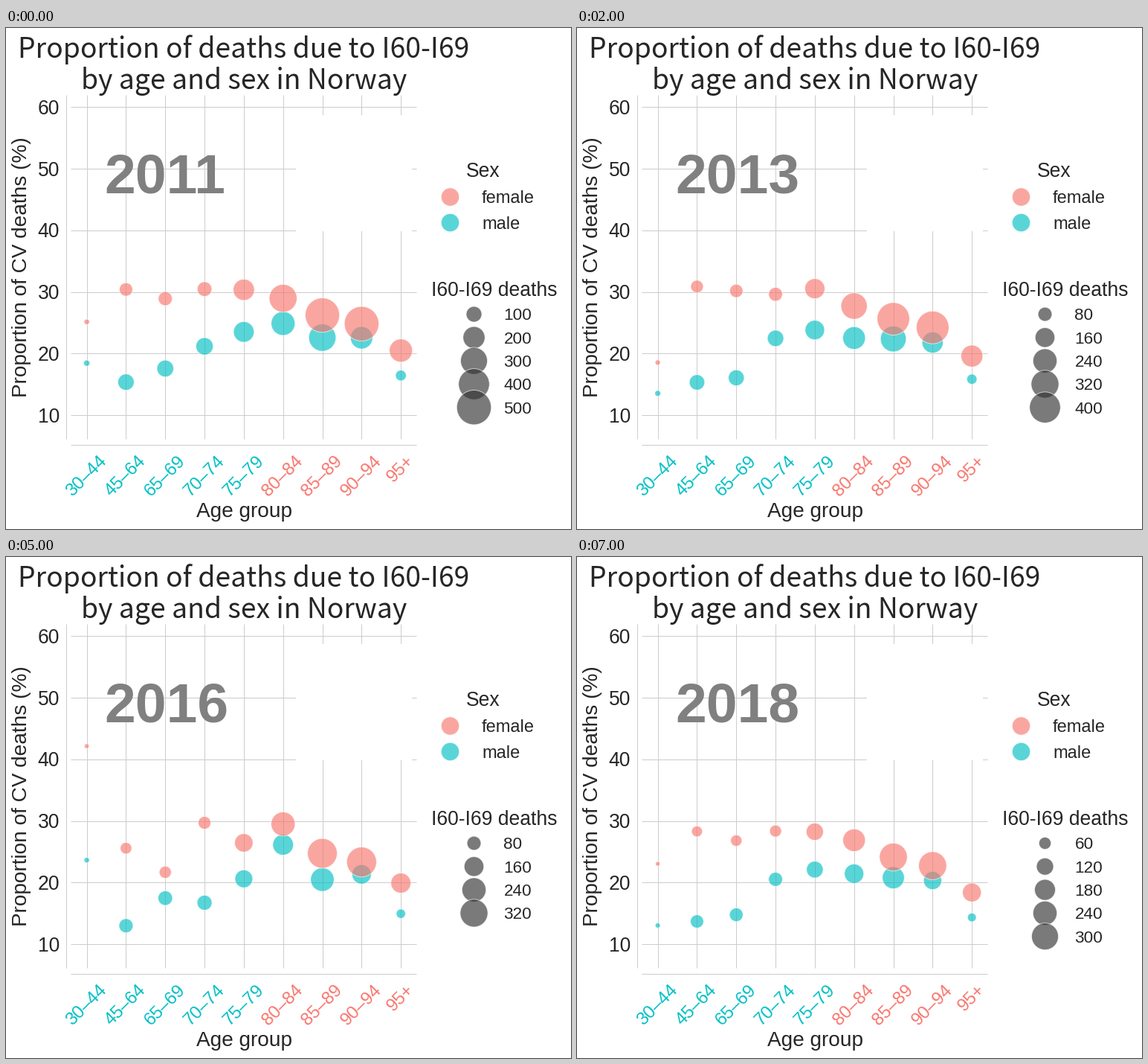
A matplotlib script that plays this animation: 760x673 px, repeating every 8 s.

```python
import numpy as np
import matplotlib.pyplot as plt
from matplotlib.animation import ArtistAnimation
from matplotlib.patches import Circle, Rectangle

W, H, DPI = 760, 673, 100
RED, TEAL, INK, GRID, GREY = "#F8766D", "#00BFC4", "#262626", "#cccccc", "#808080"
PX = 72 / DPI  # points per pixel
ALPHA = 0.65

AGES = ["30–44", "45–64", "65–69", "70–74", "75–79", "80–84", "85–89", "90–94", "95+"]
FIRST, COUNT, MID = 2011, 8, 2014.2
DRIFT = -0.3   # percentage points per year
SHRINK = 0.03  # share of the bubble radius lost per year
RADIUS_AGES = [0, 1, 3, 6, 7, 8]

# Each share is its mean, a common drift and an age group's part in the yearly swing.
MALE = dict(
    color=TEAL, z=4,
    mean=[16.9, 14.5, 16.5, 20.5, 22.7, 23.7, 21.7, 21.6, 15.5],
    part=[1, -0.13, 0.21, -0.44, -0.21, 0.41, -0.09, 0.04, 0],
    swing=[0.6, 1.1, -3.7, -3.3, -2.8, 7.3, 2.3, -2.7],
    radius=[3.6, 9.8, 10.4, 16.5, 13.5, 6.4])
FEMALE = dict(
    color=RED, z=5,
    mean=[31.2, 28.2, 25.8, 29.8, 28.5, 28.8, 25.3, 23.9, 19.9],
    part=[1, -0.18, -0.31, 0.04, -0.13, 0.11, 0, 0, 0.05],
    swing=[-7, 15.5, -13, -6, 0, 11.5, 2, -7],
    radius=[3.2, 8, 8.8, 20.9, 21, 14])

fig = plt.figure(figsize=(W / DPI, H / DPI), dpi=DPI, facecolor="white")
ax = fig.add_axes([0, 0, 1, 1])
ax.set_xlim(0, W)
ax.set_ylim(H, 0)
ax.axis("off")


def age_x(i):
    return 108.6 + 52.82 * i


def pct_y(v):
    return 603 - 8.276 * v


def text(x, y, s, px, ha="left", va="baseline", color=INK, font="Liberation Sans", **kw):
    return ax.text(x, y, s, fontsize=px * PX, ha=ha, va=va, color=color,
                   family=font, zorder=3, **kw)


def line(x0, y0, x1, y1):
    ax.plot([x0, x1], [y0, y1], color=GRID, lw=PX, solid_capstyle="butt", zorder=1)


def bubble(x, y, r, color, z=4):
    return ax.add_patch(Circle((x, y), r + 0.2, fc=color, ec="white",
                               lw=PX, alpha=ALPHA, zorder=z))


def age_color(i, year):
    if year == 2015 and i == 0:  # tie between the sexes
        return INK
    return TEAL if i < (6 if year in (2014, 2015) else 5) else RED


def size_steps(year):
    step = 100 if year < 2013 else 80 if year < 2017 else 60
    return [step * k for k in range(1, 5 if year == 2016 else 6)]


def draw_static():
    for s, y in (("Proportion of deaths due to I60-I69", 40),
                 ("by age and sex in Norway", 82)):
        text(320, y, s, 37.3, ha="center", font="Noto Sans CJK JP")
    for v in range(10, 61, 10):
        line(87, pct_y(v), 552, pct_y(v))
        text(72, pct_y(v) + 9.5, str(v), 26.5, ha="right")
    for i in range(len(AGES)):
        line(age_x(i), 90, age_x(i), 552)
    line(81, 90, 81, 552)
    line(87, 559.9, 552, 559.9)
    ax.add_patch(Rectangle((390, 117), 156, 156, fc="white", lw=0, zorder=2))
    text(320, 657, "Age group", 28, ha="center")
    text(21.5, 321.5, "Proportion of CV deaths (%)", 28, ha="center", va="center",
         rotation=90)

    text(642, 200, "Sex", 26.5, ha="center")
    for s, y, color in (("female", 227, RED), ("male", 261.5, TEAL)):
        bubble(597.5, y, 12, color)
        text(640, y + 8, s, 23.6)
    text(657, 360, "I60-I69 deaths", 26.5, ha="center")


def draw_bubbles(sex, year):
    t = year - MID
    pct = np.add(sex["mean"], DRIFT * t) + np.multiply(sex["part"], sex["swing"][year - FIRST])
    rad = np.interp(range(len(AGES)), RADIUS_AGES, sex["radius"]) * (1 - SHRINK * t)
    return [bubble(age_x(i), pct_y(v), r, sex["color"], sex["z"])
            for i, (v, r) in enumerate(zip(pct, rad))]


def draw_year(year):
    parts = [text(132, 222, str(year), 75, color=GREY, weight="bold")]
    for i, age in enumerate(AGES):
        parts.append(text(age_x(i), 570.5, age, 24, ha="center", va="top",
                          color=age_color(i, year), rotation=45))
    parts += draw_bubbles(MALE, year) + draw_bubbles(FEMALE, year)
    for k, n in enumerate(size_steps(year)):
        y = 384.5 + 31.3 * k
        parts.append(bubble(629.5, y, 1.03 * np.sqrt(n), "#333333"))
        parts.append(text(669.5, y + 8, str(n), 22.5))
    return parts


draw_static()
anim = ArtistAnimation(fig, [draw_year(FIRST + k) for k in range(COUNT)], interval=1000,
                       repeat=True, repeat_delay=0, blit=False)
plt.show()
```
